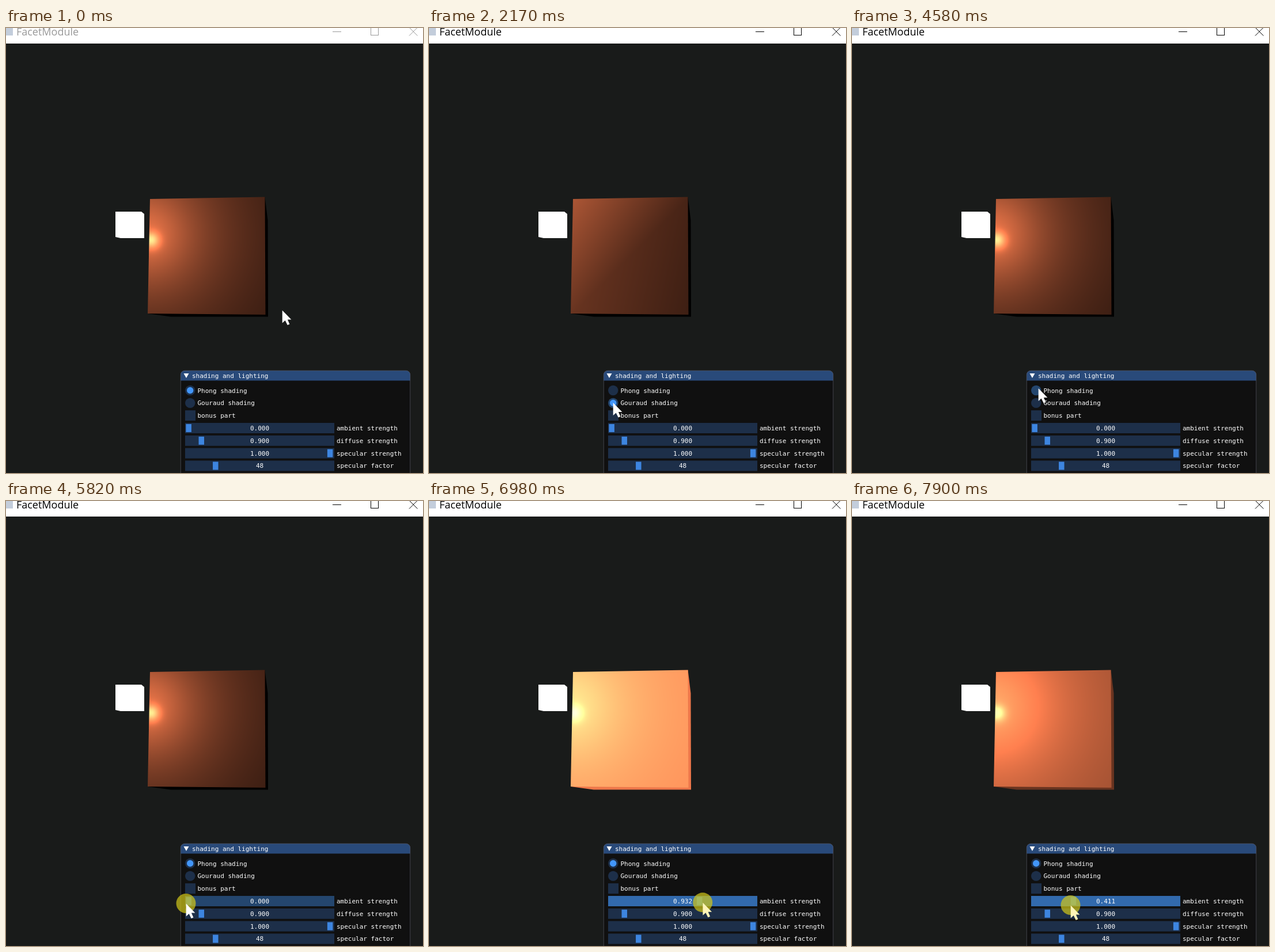
An HTML page with a canvas that plays this animation: 724x773 px, repeating every 8000 ms.

```html
<!DOCTYPE html>
<html lang="en">
<head>
<meta charset="utf-8">
<title>Shading and lighting</title>
<style>
html, body { margin: 0; width: 100%; height: 100%; overflow: hidden; background: #191b1a; }
canvas { display: block; }
</style>
</head>
<body>
<canvas id="stage" width="724" height="773"></canvas>
<script>
const W = 724, H = 773, LOOP = 8000;
const ctx = document.getElementById('stage').getContext('2d');
const FRAME = '#1d2f49', HOVER = '#24466e', ACTIVE = '#326aad';
const GRAB = '#3d85e0', MARK = '#4296fa';

const clamp = (v, lo, hi) => Math.min(hi, Math.max(lo, v));
const mix = (a, b, k) => a + (b - a) * k;
const during = (t, from, to) => t >= from && t < to;

function poly(points, color) {
  ctx.beginPath();
  for (const [x, y] of points) ctx.lineTo(x, y);
  ctx.closePath();
  if (color) { ctx.fillStyle = color; ctx.fill(); }
}

function rect(x, y, w, h, color) {
  ctx.fillStyle = color;
  ctx.fillRect(x, y, w, h);
}

function disc(x, y, r, color) {
  ctx.beginPath();
  ctx.arc(x, y, r, 0, 7);
  ctx.fillStyle = color;
  ctx.fill();
}

function label(text, x, y, align = 'left') {
  ctx.font = '11px "DejaVu Sans Mono", monospace';
  ctx.textAlign = align;
  ctx.fillStyle = '#fff';
  ctx.fillText(text, x, y);
}

// Pointer

const REST = { x: 479, y: 490 };
const MOVES = [
  { from: 640, to: 1500, x: 319, y: 650.5 },
  { from: 3870, to: 4260, x: 323, y: 625.5 },
  { from: 4880, to: 5650, x: 312, y: 699 },
  { from: 5830, to: 6380, x: 372, y: 698 },
  { from: 6450, to: 7286, x: 534, y: 697 },
  { from: 7340, to: 7610, x: 441.4, y: 700 },
  { from: 7610, to: 7900, x: 379, y: 702 }
];

function pointerAt(t) {
  return MOVES.reduce((p, m) => {
    const k = clamp((t - m.from) / (m.to - m.from), 0, 1);
    return { x: mix(p.x, m.x, k), y: mix(p.y, m.y, k) };
  }, REST);
}

function drawPointer({ x, y, pressed, dragging }) {
  if (pressed) disc(x + 0.5, y, 17, 'rgba(210, 200, 25, .7)');
  ctx.save();
  ctx.translate(x + 0.7, y + 0.5);
  poly([[0, 0], [0, 22], [5, 17.5], [9, 25.5], [12.7, 24], [9.2, 16], [15.7, 16]],
    dragging ? '#fff5b8' : '#fff');
  ctx.restore();
}

// Lit cube: lighting is computed in pixel units on the front face

const LIGHT = [243, 358, 70], EYE = [329, 454, 600];
const FACE = { x: 245, y: 292, size: 208 };
const TL = [250, 297], TR = [449.5, 293.5], BR = [450.5, 498], BL = [246, 496];

function phong(x, y) {
  const l = [LIGHT[0] - x, LIGHT[1] - y, LIGHT[2]];
  const e = [EYE[0] - x, EYE[1] - y, EYE[2]];
  const ll = Math.hypot(...l), el = Math.hypot(...e);
  const shine = (l[2] * e[2] - l[0] * e[0] - l[1] * e[1]) / (ll * el);
  return 0.9 * l[2] / ll + Math.max(0, shine) ** 48;
}

// Corner light blended over the two triangles of the face
function gouraud(x, y) {
  const [tl, tr, br, bl] = corners;
  const u = (x - 248) / 202, v = (y - 296) / 202;
  return u + v < 1
    ? tl + u * (tr - tl) + v * (bl - tl)
    : br + (1 - u) * (bl - br) + (1 - v) * (tr - br);
}

function bake(shader) {
  const n = FACE.size;
  return Float32Array.from({ length: n * n },
    (_, i) => shader(FACE.x + i % n + 0.5, FACE.y + Math.floor(i / n) + 0.5));
}

const corners = [TL, TR, BR, BL].map(p => phong(...p));
const maps = { phong: bake(phong), gouraud: bake(gouraud) };
const tile = document.createElement('canvas');
tile.width = tile.height = FACE.size;
const tileCtx = tile.getContext('2d');
const pixels = tileCtx.createImageData(FACE.size, FACE.size);
let shaded = '';

const coral = light => [255 * light, 127.5 * light, 79 * light];

function shadeFace(mode, ambient) {
  const key = mode + ambient;
  if (key === shaded) return;
  shaded = key;
  maps[mode].forEach((v, i) => pixels.data.set([...coral(v + ambient), 255], i * 4));
  tileCtx.putImageData(pixels, 0, 0);
}

function drawScene(mode, ambient) {
  poly([TR, [454.5, 334], [455, 501.5], [286, 501.5], BL], `rgb(${coral(ambient)})`);
  shadeFace(mode, ambient);
  ctx.save();
  poly([TL, TR, BR, BL]);
  ctx.clip();
  ctx.drawImage(tile, FACE.x, FACE.y);
  ctx.restore();
  poly([[190, 319], [235, 319], [240, 323], [240, 365], [199, 365], [190, 363]], '#fff');
}

// Window frame

function drawTitleBar(focused) {
  const ink = focused ? '#000' : '#999';
  rect(0, 0, W, 27, '#fff');
  rect(0, 0, 12, 13, '#c3cddb');
  ctx.font = '18px "Open Sans", "Noto Sans", sans-serif';
  ctx.textAlign = 'left';
  ctx.fillStyle = ink;
  ctx.fillText('FacetModule', 18, 12.5);
  ctx.strokeStyle = ink;
  ctx.lineWidth = 1;
  ctx.strokeRect(633.5, -0.5, 13, 13);
  ctx.beginPath();
  ctx.moveTo(567, 6.5); ctx.lineTo(582, 6.5);
  ctx.moveTo(700, -1); ctx.lineTo(714.5, 13.5);
  ctx.moveTo(714.5, -1); ctx.lineTo(700, 13.5);
  ctx.stroke();
}

// Control panel

const LEFT = 311, TRACK = 259, BOX = 18;
const rowY = i => 629.5 + 21.83 * i;

function drawSlider(row, text, value, ratio, color = FRAME, grab = GRAB) {
  const y = rowY(row);
  rect(LEFT, y - BOX / 2, TRACK, BOX, color);
  rect(mix(312.4, 557.9, ratio), y - 7, 9.5, 14, grab);
  label(value, 440.5, y + 4, 'center');
  label(text, 574, y + 4);
}

function drawPanel(s) {
  const tone = (row, width) => {
    const over = s.focused && during(s.x, LEFT - 1, LEFT + width) && Math.abs(s.y - rowY(row)) < 10;
    return !over ? FRAME : s.pressed ? ACTIVE : HOVER;
  };

  ctx.beginPath();
  ctx.roundRect(303.3, 595.2, 398.4, 190, 7);
  ctx.fillStyle = '#101010';
  ctx.fill();
  ctx.save();
  ctx.clip();
  rect(303, 595, 399, 17.5, '#294a7a');
  ctx.restore();
  ctx.strokeStyle = 'rgba(110, 110, 128, .5)';
  ctx.lineWidth = 1;
  ctx.stroke();
  poly([[308.5, 600], [317.5, 600], [313, 608]], '#fff');
  label('shading and lighting', 323, 608);

  ['Phong shading', 'Gouraud shading'].forEach((text, row) => {
    const y = rowY(row);
    disc(319.7, y, 8.7, tone(row, 120));
    if (s.dot === row) disc(319.7, y, 5.7, MARK);
    label(text, 332.5, y + 4);
  });
  rect(LEFT, rowY(2) - BOX / 2, BOX, BOX, tone(2, 90));
  label('bonus part', 332.5, rowY(2) + 4);

  drawSlider(3, 'ambient strength', s.ambient.toFixed(3), s.ambient / 1.5,
    s.dragging ? ACTIVE : s.pressed && tone(3, TRACK) !== FRAME ? HOVER : tone(3, TRACK),
    s.dragging ? MARK : GRAB);
  drawSlider(4, 'diffuse strength', '0.900', 0.09);
  drawSlider(5, 'specular strength', '1.000', 1);
  drawSlider(6, 'specular factor', '48', 0.19);
}

function draw(now) {
  const t = Math.floor(now % LOOP / 10) * 10;
  const dragging = t >= 5910;
  const handle = pointerAt(t - 25).x; // the slider trails the pointer a little
  const smooth = !during(t, 2170, 4580);
  const state = {
    ...pointerAt(t),
    dragging,
    focused: t >= 1930,
    pressed: during(t, 1930, 2170) || during(t, 4410, 4580) || t >= 5760,
    ambient: dragging ? clamp((handle - 317) / 246, 0, 1) * 1.5 : 0,
    dot: during(t, 4580, 4630) ? -1 : smooth ? 0 : 1
  };
  rect(0, 0, W, H, '#191b1a');
  drawTitleBar(state.focused);
  drawScene(smooth ? 'phong' : 'gouraud', state.ambient);
  drawPanel(state);
  drawPointer(state);
}

const start = performance.now();
function tick() {
  draw(performance.now() - start);
  requestAnimationFrame(tick);
}
tick();
</script>
</body>
</html>
```
